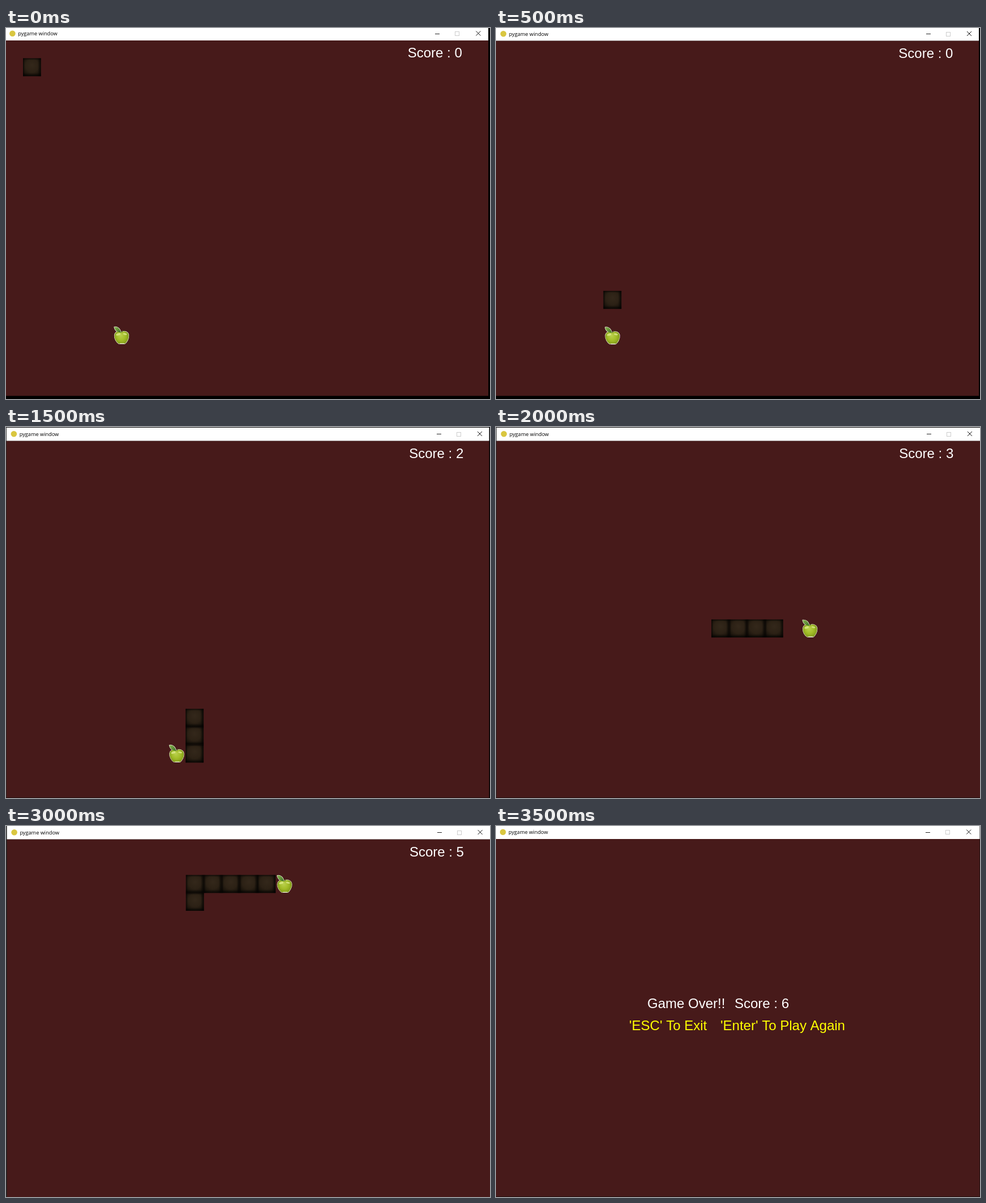
Write an HTML page with a canvas that moves like this. It is 854 px wide and 656 px high and loops after 4 s.

```html
<!DOCTYPE html>
<html lang="en">
<head>
<meta charset="utf-8">
<title>Snake</title>
<style>
html, body { margin: 0; width: 100%; height: 100%; overflow: hidden; background: #000; }
canvas { display: block; }
</style>
</head>
<body>
<canvas id="stage" width="854" height="656"></canvas>
<script>
const ctx = document.getElementById('stage').getContext('2d');
const CELL = 31.6;
const HOLD = 500;

// x, y: origin of the playfield; right, bottom: window edges; cells are [column, row]
const shots = [
  { x: -1.6, y: 22, right: 851, bottom: 650.5, score: 0, snake: [[1, 1]], apple: [6, 16] },
  { x: 0, y: 22.5, right: 852, bottom: 650.5, score: 0, snake: [[6, 14]], apple: [6, 16] },
  { x: 0.9, y: 23, right: 852.5, bottom: 650.5, score: 1, snake: [[23, 13], [23, 14]], apple: [23, 11] },
  { x: 0.9, y: 24.5, right: 852.5, bottom: 655.5, score: 2, snake: [[10, 15], [10, 16], [10, 17]], apple: [9, 17] },
  { x: 0.9, y: 24.5, right: 854, bottom: 655.5, score: 3, snake: [[12, 10], [13, 10], [14, 10], [15, 10]], apple: [17, 10] },
  { x: 0.9, y: 24.5, right: 854, bottom: 655.5, score: 4, snake: [[18, 5], [19, 5], [19, 6], [19, 7]], apple: [17, 5] },
  { x: 1.6, y: 23.5, right: 854, bottom: 656, score: 5,
    snake: [[10, 3], [10, 2], [11, 2], [12, 2], [13, 2], [14, 2]], apple: [15, 2] },
  { x: -0.8, y: 23, right: 853.5, bottom: 655.5, score: 6, over: true }
];

function rect(x, y, w, h, fill) {
  ctx.fillStyle = fill;
  ctx.fillRect(x, y, w, h);
}

function text(str, x, y, fill = '#fff', font = '24px "Liberation Sans", Arial, sans-serif') {
  ctx.font = font;
  ctx.fillStyle = fill;
  ctx.fillText(str, x, y);
}

function gradient(g, ...stops) {
  stops.forEach(([at, color]) => g.addColorStop(at, color));
  return g;
}

function inCell(shot, [col, row], draw) {
  ctx.save();
  ctx.translate(shot.x + col * CELL, shot.y + row * CELL);
  draw();
  ctx.restore();
}

function drawBlock() {
  rect(0, 0, CELL, CELL, gradient(ctx.createRadialGradient(16, 12, 1, 16, 14, 22),
    [0, '#33271a'], [0.5, '#2c2115'], [0.8, '#1b140c'], [1, '#0b0805']));
  const edge = [[0, 'rgba(5,4,2,.75)'], [0.1, 'rgba(5,4,2,0)'], [0.82, 'rgba(5,4,2,0)'], [1, 'rgba(5,4,2,.8)']];
  rect(0, 0, CELL, CELL, gradient(ctx.createLinearGradient(0, 0, CELL, 0), ...edge));
  rect(0, 0, CELL, CELL, gradient(ctx.createLinearGradient(0, 0, 0, CELL), ...edge));
}

const leaf = new Path2D('M3 1 C8 0 13 3 15 11 C10 11 4 8 3 1 Z');
const stem = new Path2D('M16 11 Q16 9 18.5 7.5');
const body = new Path2D('M16 10.5 C20 7 28 9 28.5 16 C29 22 25 28 22 30.5 H11 C7 28 3 22 3.5 16 C4 9 12 7 16 10.5 Z');

function drawApple() {
  ctx.lineJoin = 'round';
  ctx.lineWidth = 1.3;
  ctx.strokeStyle = '#f4f6e6';
  ctx.stroke(body);
  ctx.stroke(leaf);
  ctx.fillStyle = gradient(ctx.createRadialGradient(14, 15, 1, 16, 19, 14),
    [0, '#b9cf4c'], [0.5, '#a3bd28'], [0.85, '#87a01c'], [1, '#6d8418']);
  ctx.fill(body);
  ctx.fillStyle = gradient(ctx.createLinearGradient(4, 1, 14, 11), [0, '#86b04e'], [1, '#3f7426']);
  ctx.fill(leaf);
  ctx.strokeStyle = '#5d6b26';
  ctx.stroke(stem);
  ctx.fillStyle = 'rgba(232,242,160,.65)';
  ctx.beginPath();
  ctx.ellipse(10, 14, 4, 2, -0.3, 0, 7);
  ctx.ellipse(22, 13.5, 3.5, 1.6, 0.2, 0, 7);
  ctx.fill();
  rect(13, 30, 8, 1.2, '#f4f6e6');
}

function drawTitleBar({ x, y, right }) {
  const left = Math.max(0, x);
  const mid = y - 12;
  const top = Math.max(0, y - 23.5);
  rect(left, top, right - left, y - top, '#fff');
  ctx.fillStyle = '#d9c640';
  ctx.beginPath();
  ctx.arc(x + 13, mid - 0.3, 5.3, 0, 7);
  ctx.fill();
  text('pygame window', x + 22.8, mid + 3.4, '#000', '9.2px "Open Sans", sans-serif');

  rect(Math.round(x + 759), Math.round(mid - 0.5), 8, 1, '#222');
  ctx.lineWidth = 1;
  ctx.strokeStyle = '#ccc';
  ctx.strokeRect(Math.round(x + 795) - 0.5, Math.round(mid - 4) + 0.5, 7, 7);
  ctx.strokeStyle = '#111';
  ctx.beginPath();
  for (const d of [-4, 4]) {
    ctx.moveTo(x + 835 - d, mid - 4.5);
    ctx.lineTo(x + 835 + d, mid + 3.5);
  }
  ctx.stroke();
}

function drawShot(shot) {
  const { x, y, right, bottom, score } = shot;
  const left = Math.max(0, x);
  rect(0, 0, 854, 656, '#000');
  rect(0, 0, left, bottom, '#2b2b2b');
  rect(left, y, right - left, bottom - y, '#471a1a');
  drawTitleBar(shot);
  if (shot.over) {
    text('Game Over!!', 267, 321.5);
    text(`Score : ${score}`, 421, 321.5);
    text("'ESC' To Exit", 235, 361, '#ff0');
    text("'Enter' To Play Again", 396, 361, '#ff0');
    return;
  }
  for (const cell of shot.snake) inCell(shot, cell, drawBlock);
  inCell(shot, shot.apple, drawApple);
  text(`Score : ${score}`, x + 710.3, y + 30.3);
}

const start = performance.now();
function tick() {
  const elapsed = performance.now() - start;
  drawShot(shots[Math.floor(elapsed / HOLD) % shots.length]);
  requestAnimationFrame(tick);
}
tick();
</script>
</body>
</html>
```
